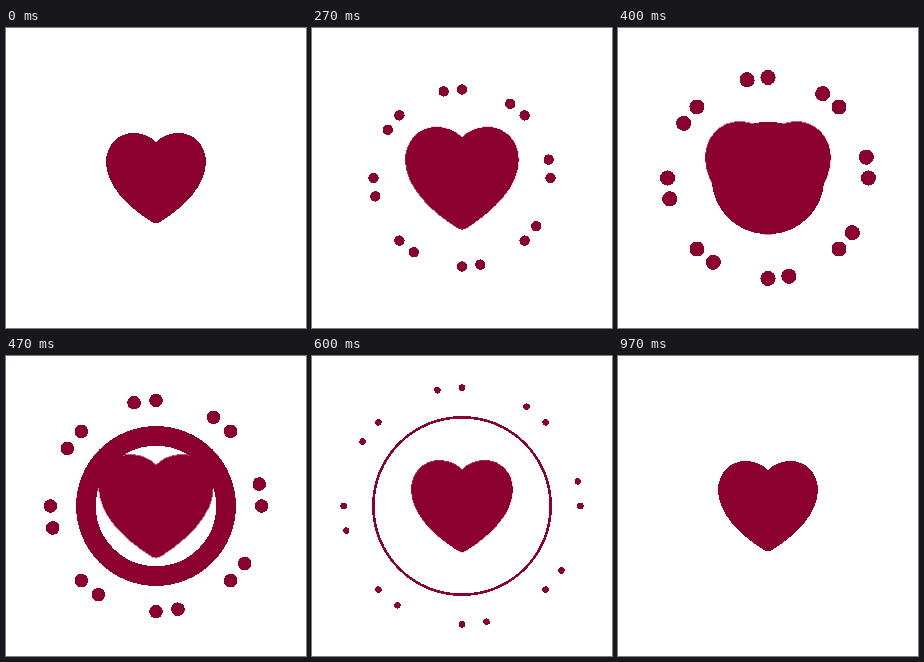
These frames come from a looping animation (300x300 px, 1510 ms). An HTML page:

```html
<!DOCTYPE html>
<html lang="en">
<head>
<meta charset="utf-8">
<title>Heart burst</title>
<style>
  html, body { margin: 0; width: 100%; height: 100%; overflow: hidden; background: #fff; }
  svg { display: block; width: 100%; height: 100%; shape-rendering: crispEdges; }
  #heart, .dot { fill: #8b002e; }
  #ring { fill: none; stroke: #8b002e; stroke-width: 0; }
</style>
</head>
<body>
<svg viewBox="-150 -150 300 300">
  <g id="burst"></g>
  <circle id="ring" r="0"/>
  <path id="heart" d="M0 -36C-6 -42 -14 -45 -23 -45C-38 -45 -50 -32.5 -50 -16C-50 7 -29 28 -5 43.5Q0 47 5 43.5C29 28 50 7 50 -16C50 -32.5 38 -45 23 -45C14 -45 6 -42 0 -36Z"/>
</svg>
<script>
  const LOOP = 1510;
  const STEPS = 20;

  const smooth = u => u * u * (3 - 2 * u);
  const outSine = u => Math.sin(u * Math.PI / 2);
  const outExpo = u => 1 - 2 ** (-7.5 * u);

  // Value at step k, easing from one value to the next between two steps.
  function tween(k, start, end, from, to, ease = smooth) {
    if (k <= start) return from;
    if (k >= end) return to;
    return from + (to - from) * ease((k - start) / (end - start));
  }

  // Shrink, swell, fall back, then settle.
  function scale(k) {
    if (k < 3) return tween(k, 0, 3, 1, .72);
    if (k < 7) return tween(k, 3, 7, .72, 1.31, outSine);
    if (k < 10.7) return tween(k, 7, 10.7, 1.31, 1.02);
    return tween(k, 10.7, 19, 1.02, 1);
  }

  const outer = k => tween(k, 5.2, 10, 0, 90);
  const inner = k => tween(k, 7.65, 14, 0, 90, outExpo);
  const reach = k => tween(k, 3.8, 13.5, 87.1, 120.5);
  const size = k => k < 7 ? tween(k, 3.3, 7, 0, 7.8, outSine) : tween(k, 7, 16, 7.8, 0);

  // Steps alternate between 70 and 30 ms.
  const startOf = k => 100 * Math.floor(k / 2) + (k % 2) * 70;

  function play(el, pose) {
    const frames = Array.from({ length: STEPS }, (_, k) => ({
      ...pose(k), offset: startOf(k) / LOOP, easing: "steps(1, end)"
    }));
    frames.push({ ...pose(STEPS - 1), offset: 1 });
    el.animate(frames, { duration: LOOP, iterations: Infinity });
  }

  function addDot(angle) {
    const ns = "http://www.w3.org/2000/svg";
    const arm = document.createElementNS(ns, "g");
    const dot = document.createElementNS(ns, "circle");
    arm.setAttribute("transform", `rotate(${angle})`);
    dot.setAttribute("class", "dot");
    arm.append(dot);
    document.getElementById("burst").append(arm);
    play(dot, k => ({ cy: -reach(k) + "px", r: size(k) + "px" }));
  }

  for (let i = 0; i < 8; i++) {
    addDot(i * 45);
    addDot(i * 45 - 12);
  }

  play(document.getElementById("heart"), k => ({ transform: `scale(${scale(k)})` }));

  play(document.getElementById("ring"), k => ({
    r: (outer(k) + inner(k)) / 2 + "px",
    strokeWidth: outer(k) - inner(k) + "px"
  }));
</script>
</body>
</html>
```
